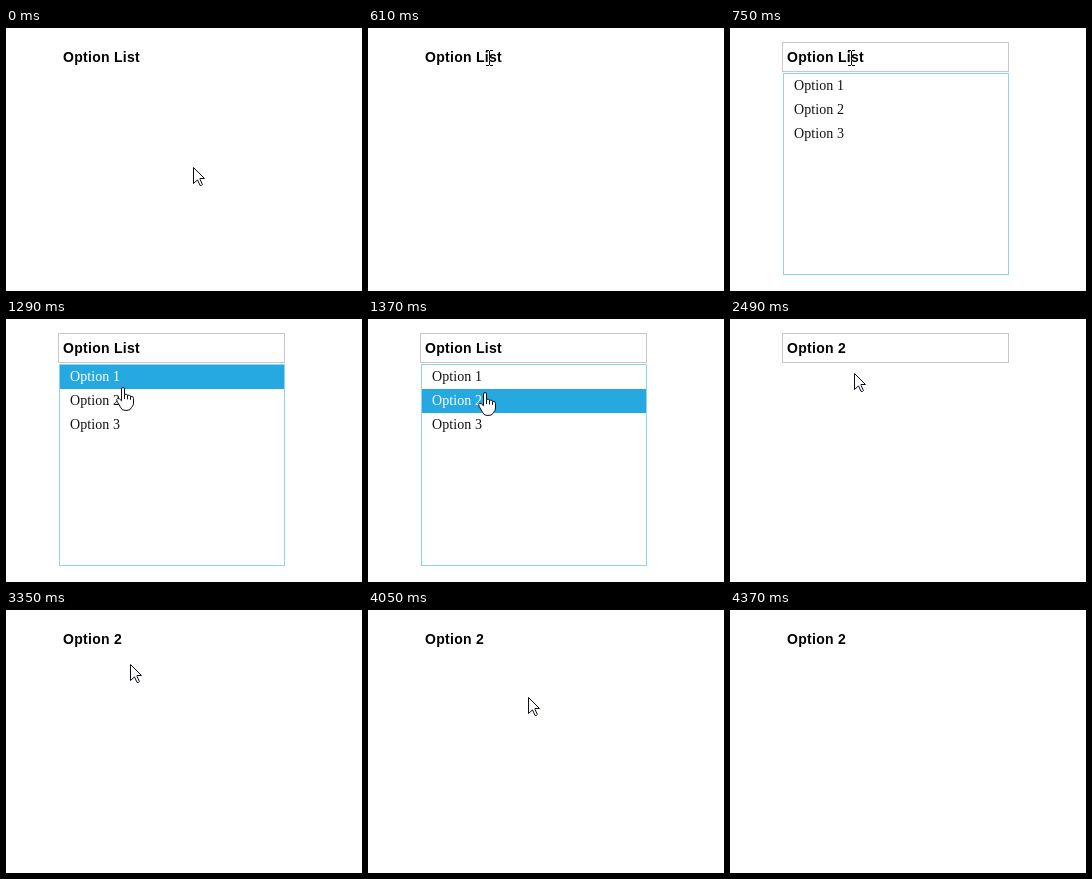
Animation, 356 px wide and 263 px high, one loop 4.99 s. Source, as an HTML page:

```html
<!DOCTYPE html>
<html lang="en">
<head>
<meta charset="utf-8">
<title>Option list</title>
<style>
  html, body { margin: 0; width: 100%; height: 100%; overflow: hidden; background: #fff; }
  svg { display: block; width: 100vw; height: 100vh; }
  #title { font: bold 14px "Liberation Sans", Arial, sans-serif; letter-spacing: .29px; }
  .row text { font: 14px "Liberation Serif", "Times New Roman", serif; letter-spacing: .08px; fill: #111; }
  .row rect { fill: none; }
  .row.on rect { fill: #26a8e0; }
  .row.on text { fill: #fff; }
  .outline { fill: #fff; stroke: #0c0c1c; stroke-linejoin: round; }
  #beam { fill: none; stroke: #fff; mix-blend-mode: difference; }
</style>
</head>
<body>
<svg viewBox="0 0 356 263" xmlns="http://www.w3.org/2000/svg">
  <rect width="356" height="263" fill="#fff"/>
  <rect id="field" x="52.5" y="14.5" width="226" height="29" fill="none" stroke="#c8c8c8"/>
  <text id="title" x="57" y="34"></text>
  <rect id="caret" x="116" y="21" width="1" height="16"/>
  <g id="list">
    <rect x="53.5" y="45.5" width="225" height="201" fill="#fff" stroke="#8fd3ef"/>
  </g>
  <!-- pointers: the hotspot is the origin -->
  <path id="arrow" class="outline" d="M.5 .5V16.5L4.5 12.9 7 18.4H8.6L9.4 17.5 7 12.3V11.5H11.5Z"/>
  <g id="hand" class="outline">
    <path d="M-.5 13.5V2Q-.5 .5 1 .5T2.5 2V7.5Q5 6.3 5.5 8.3 8 7.3 8.5 9.3 11.5 8.8 11.5 11.5V16Q11.5 18.5 9.5 20.5 8.5 23.4 5 23.4H3Q-.5 23.4 -1.5 20.2L-4.8 14.5Q-6 11.8 -4.3 11.4 -2.8 11 -.5 13.8Z"/>
    <path d="M2.5 7.5V12M5.5 8.3V12.3M8.5 9.3V12.8"/>
  </g>
  <path id="beam" d="M-3 -7.5H0M1 -7.5H4M.5 -7V7M-3 7.5H0M1 7.5H4"/>
</svg>
<script>
const LOOP = 4990, STEP = 80, ROW_TOP = 46, ROW_H = 24;
const OPEN = 750, PICK = 1930, CARET_OFF = 2490, BLUR = 3350;
const $ = id => document.getElementById(id);
const show = (el, on) => el.setAttribute("visibility", on ? "visible" : "hidden");

// Each move starts where the last ended; pow > 1 slows down, pow < 1 speeds up.
const home = { x: 187, y: 139 };
const moves = [
  { from: -10, to: 570, x: 121, y: 30, pow: 2 },
  { from: 1050, to: 1670, x: 115, y: 79, pow: 3 },
  { from: 2250, to: 2490, x: 124, y: 54, pow: 1 },
  { from: 3970, to: 4370, x: 464, y: 369, pow: .5 }
];

function pointer(t) {
  let { x, y } = home;
  for (const m of moves) {
    if (t < m.from) break;
    const stepped = Math.floor((t - m.from) / STEP) * STEP;
    const p = Math.min(1, stepped / (m.to - m.from));
    const e = 1 - (1 - p) ** m.pow;
    x += (m.x - x) * e;
    y += (m.y - y) * e;
  }
  return [Math.round(x), Math.round(y)];
}

const rows = [0, 1, 2].map(i => {
  const g = document.createElementNS("http://www.w3.org/2000/svg", "g");
  const y = ROW_TOP + i * ROW_H;
  g.innerHTML = `<rect x="54" y="${y}" width="224" height="${ROW_H}"/>` +
    `<text x="64" y="${y + 16}">Option ${i + 1}</text>`;
  $("list").append(g);
  return g;
});

function render(t) {
  const open = t >= OPEN && t < PICK;
  const [x, y] = pointer(t);

  $("title").textContent = t < PICK ? "Option List" : "Option 2";
  show($("field"), t >= OPEN && t < BLUR);
  show($("caret"), t >= PICK && t < CARET_OFF);
  show($("list"), open);

  const over = open ? Math.floor((y - ROW_TOP) / ROW_H) : -1;
  rows.forEach((g, i) => g.setAttribute("class", i === over ? "row on" : "row"));

  const kind = y < 44 ? "beam" : over >= 0 ? "hand" : "arrow";
  for (const id of ["arrow", "hand", "beam"]) {
    show($(id), id === kind);
    $(id).setAttribute("transform", `translate(${x} ${y})`);
  }
}

const start = performance.now();
function tick() {
  render((performance.now() - start) % LOOP);
  requestAnimationFrame(tick);
}
tick();
</script>
</body>
</html>
```
